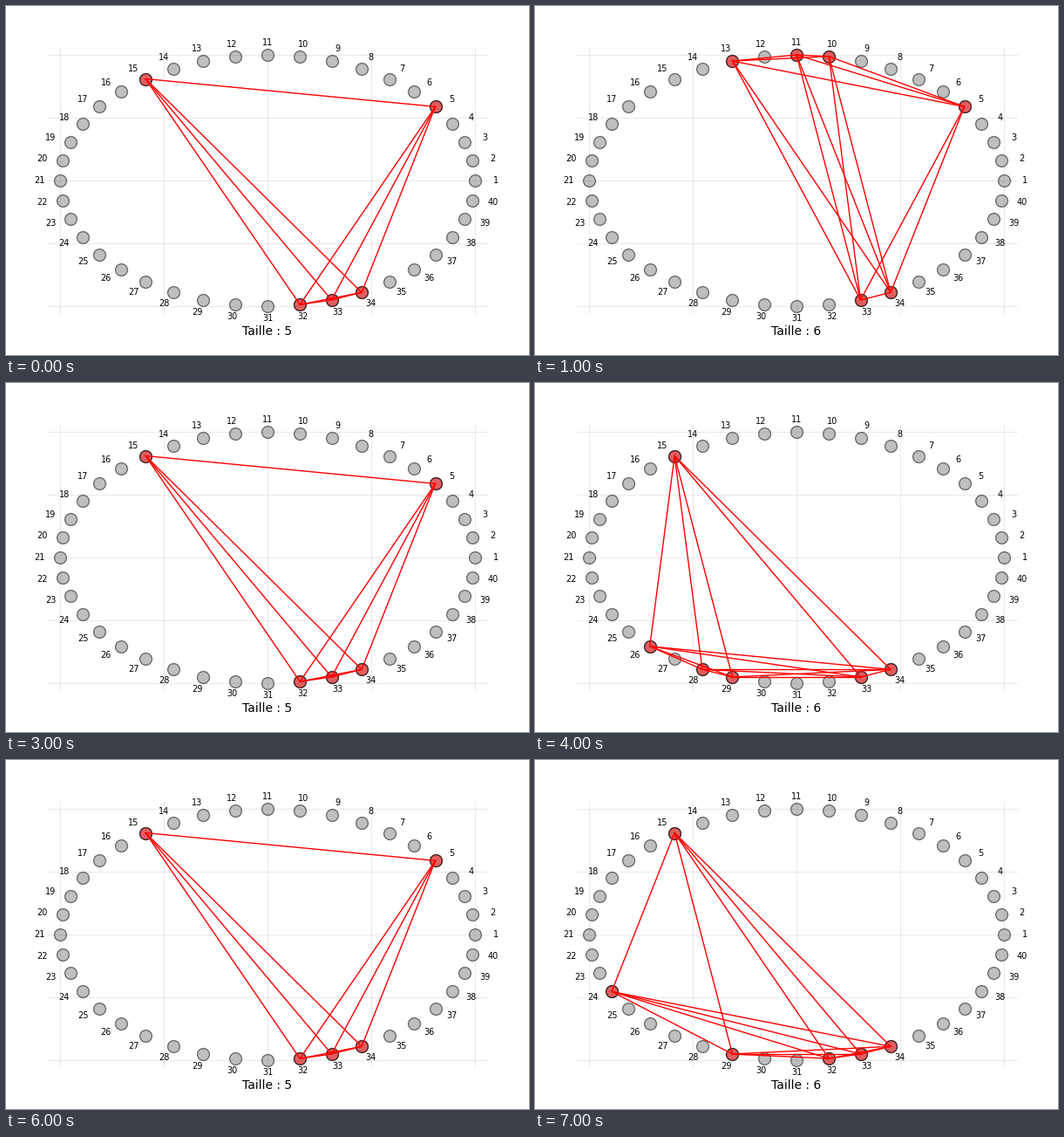
These frames come from a looping animation (600x400 px, 8000 ms). A matplotlib script:

```python
from itertools import combinations

import matplotlib.pyplot as plt
import numpy as np
from matplotlib.animation import FuncAnimation
from matplotlib.collections import LineCollection

W, H, DPI = 600, 400, 100
COUNT = 40
CENTER = np.array([300, 200])
RADII = np.array([238, 144])

# Clique shown during each second of the loop
START = [5, 15, 32, 33, 34]
CLIQUES = [
    START,
    [5, 10, 11, 13, 33, 34],
    [5, 9, 10, 11, 13, 33, 34],
    START,
    [15, 26, 28, 29, 33, 34],
    [13, 15, 24, 28, 29, 33, 34],
    START,
    [15, 24, 29, 32, 33, 34],
]

angles = 2 * np.pi * np.arange(COUNT) / COUNT
unit = np.column_stack([np.cos(angles), np.sin(angles)])
nodes = CENTER + RADII * unit
labels = CENTER + 1.1 * RADII * unit

plt.rcParams["font.family"] = "DejaVu Sans"
fig = plt.figure(figsize=(W / DPI, H / DPI), dpi=DPI, facecolor="white")
ax = fig.add_axes([0, 0, 1, 1])
ax.set_xlim(0, W)
ax.set_ylim(0, H)
ax.axis("off")

for step in (-1, -0.5, 0, 0.5, 1):
    x, y = CENTER + step * RADII
    style = dict(color="#b0b0b0", alpha=0.25, lw=0.8, zorder=0.5)
    ax.plot([x, x], [48, 352], **style)
    ax.plot([48, 553], [y, y], **style)


def draw_nodes(points, color, zorder):
    return ax.scatter(points[:, 0], points[:, 1], s=100, c=color,
                      edgecolors="black", linewidths=1, alpha=0.5,
                      zorder=zorder)


draw_nodes(nodes, "gray", 1)
chosen = draw_nodes(nodes[:1], "red", 1.5)
edges = LineCollection([], colors="red", linewidths=1, zorder=2,
                       capstyle="projecting")
ax.add_collection(edges)

for i, (x, y) in enumerate(labels, 1):
    ax.text(x, y, str(i), size=7, ha="center", va="center", zorder=3)
caption = ax.text(300, 23, "", size=10, ha="center", va="baseline")


def update(frame):
    clique = CLIQUES[frame]
    points = nodes[np.array(clique) - 1]
    chosen.set_offsets(points)
    edges.set_segments([np.array(pair) for pair in combinations(points, 2)])
    caption.set_text(f"Taille : {len(clique)}")
    return chosen, edges, caption


anim = FuncAnimation(fig, update, frames=len(CLIQUES), interval=1000,
                     repeat=True, repeat_delay=0, blit=False)
plt.show()
```
